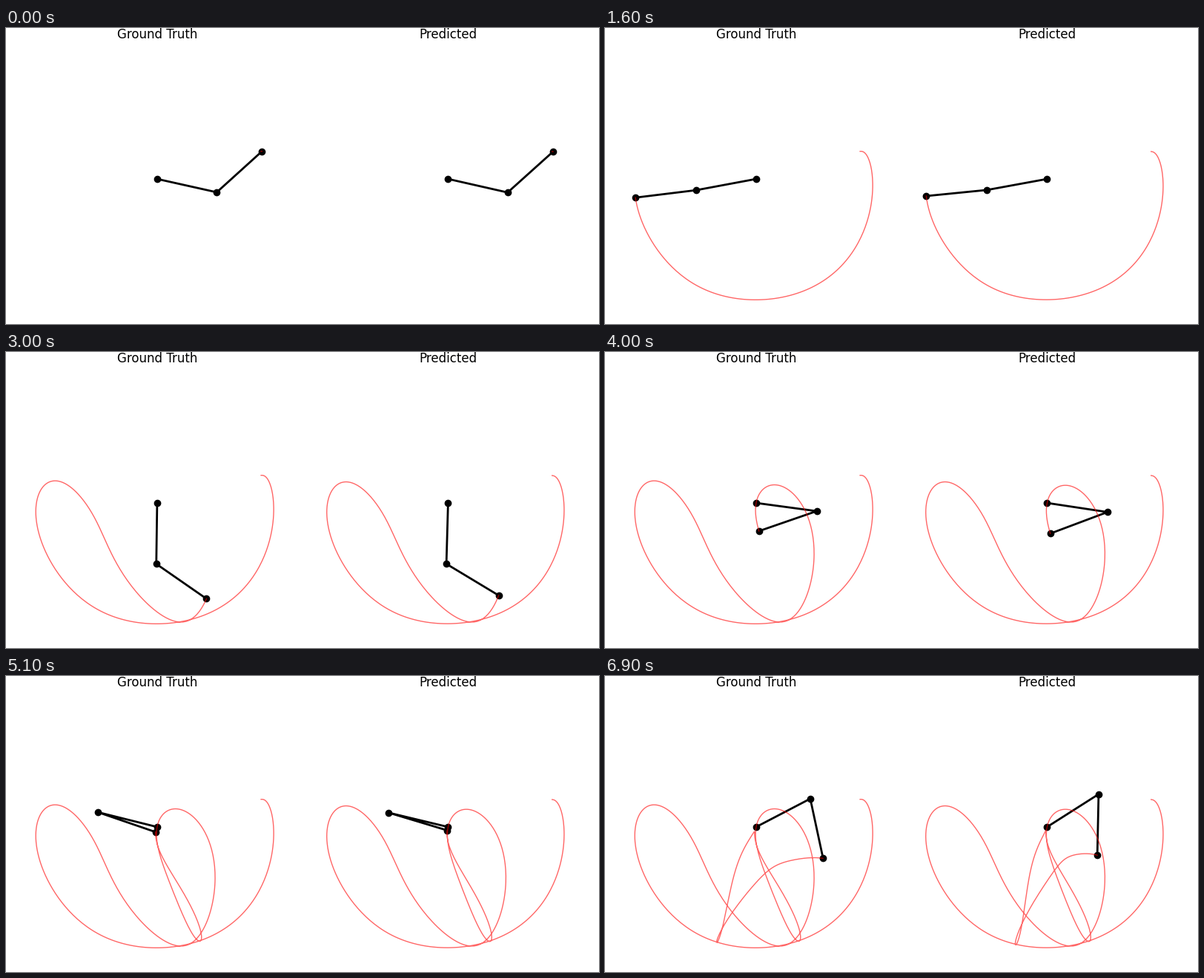
A matplotlib script for the animation above (7000 ms loop, 800 by 400 pixels).

```python
import numpy as np
import matplotlib.pyplot as plt
from matplotlib.animation import FuncAnimation

W, H, DPI = 800, 400, 100
FRAMES, INTERVAL = 70, 100
ARM = 82.4           # length of one rod in pixels
SUB = 10             # path points per frame
GRAVITY = 6.44       # gravity over rod length, per second squared

# Known poses: frame numbers, and both rod angles from straight down in degrees
KEYS = [0, 16, 30, 40, 51, 62, 69]
TRUTH = [(77.4, 132.2), (-79.4, -83.0), (-0.8, 55.2), (82.3, 289.1),
         (-104.0, 431.0), (36.0, 297.7), (117.6, 372.1)]
PREDICTED = [(77.2, 132.0), (-79.6, -84.3), (-1.6, 58.9), (81.4, 290.6),
             (-103.5, 433.2), (41.4, 298.5), (122.5, 358.8)]
# Rough angular speeds when leaving each pose, refined by fit()
SPEEDS = [0.6, -0.8, -0.3, -2.8, -1.0, 6.5, -0.5, 2.8, -1.2, -0.9, 3.6, -1.45]


def slope(s, g):
    """Equations of motion of a double pendulum with equal rods and masses."""
    a, b, va, vb = s
    c, k = np.cos(a - b), np.sin(a - b)
    r1 = -k * vb * vb - 2 * g * np.sin(a)
    r2 = k * va * va - g * np.sin(b)
    acc = (r1 - c * r2) / (2 - c * c)
    return np.array([va, vb, acc, r2 - c * acc])


def shoot(s, g, steps, dt):
    """Runge-Kutta path from state s, one column per variant."""
    path = [s]
    for _ in range(steps):
        k1 = slope(s, g)
        k2 = slope(s + dt / 2 * k1, g)
        k3 = slope(s + dt / 2 * k2, g)
        k4 = slope(s + dt * k3, g)
        s = s + dt / 6 * (k1 + 2 * k2 + 2 * k3 + k4)
        path.append(s)
    return np.array(path)


def start_state(pose, speeds):
    return np.vstack([np.repeat(pose[:, None], speeds.shape[1], axis=1), speeds])


def mismatch(poses, p, per_frame=2, eps=1e-6):
    """Residuals of the joined path and their Jacobian."""
    cols = np.hstack([p[:, None], p[:, None] + eps * np.eye(len(p))])
    g = cols[-1]
    rows = [0.1 * (g - GRAVITY)]
    last = len(KEYS) - 2
    for k in range(last + 1):
        s = start_state(poses[k], cols[2 * k:2 * k + 2])
        steps = (KEYS[k + 1] - KEYS[k]) * per_frame
        end = shoot(s, g, steps, INTERVAL / 1000 / per_frame)[-1]
        rows.extend(end[:2] - poses[k + 1][:, None])
        if k < last:
            rows.extend(0.04 * (end[2:] - cols[2 * k + 2:2 * k + 4]))
    rows = np.array(rows)
    return rows[:, 0], (rows[:, 1:] - rows[:, :1]) / eps


def fit(poses):
    """Levenberg-Marquardt search for the speeds and the gravity."""
    p = np.array(SPEEDS + [GRAVITY])
    r, jac = mismatch(poses, p)
    damp = 0.01
    for _ in range(36):
        normal = jac.T @ jac
        step = np.linalg.solve(normal + damp * np.diag(np.diag(normal) + 1e-9),
                               -jac.T @ r)
        r_new, jac_new = mismatch(poses, p + step)
        if r_new @ r_new < r @ r:
            p, r, jac = p + step, r_new, jac_new
            damp = max(damp / 5, 1e-9)
        else:
            damp *= 4
        if np.abs(step).max() < 1e-7:
            break
    return p


def swing(degrees):
    """Rod angles over the whole loop, SUB points per frame."""
    poses = np.radians(degrees)
    p = fit(poses)
    parts = []
    for k in range(len(KEYS) - 1):
        steps = (KEYS[k + 1] - KEYS[k]) * SUB
        s = start_state(poses[k], p[2 * k:2 * k + 2, None])
        path = shoot(s, p[-1:], steps, INTERVAL / 1000 / SUB)[:, :2, 0]
        path += np.linspace(0, 1, steps + 1)[:, None] * (poses[k + 1] - path[-1])
        parts.append(path[:-1])
    lead_in = poses[0] - 0.02 * p[:2]
    return np.vstack([lead_in, *parts, poses[-1]])


class Pendulum:
    def __init__(self, ax, title, center, degrees):
        angles = swing(degrees)
        rods = ARM * np.stack([np.sin(angles), np.cos(angles)], axis=-1)
        self.pivot = np.array(center)
        self.elbow = self.pivot + rods[:, 0]
        self.tip = self.elbow + rods[:, 1]
        self.arm, = ax.plot([], [], "o-", color="black", lw=2, markersize=6)
        self.trail, = ax.plot([], [], color="red", lw=1, alpha=0.6)
        ax.text(center[0], 14, title, fontsize=12, ha="center", va="baseline")

    def show(self, frame):
        i = 1 + frame * SUB
        self.arm.set_data(*np.array([self.pivot, self.elbow[i], self.tip[i]]).T)
        self.trail.set_data(*self.tip[:i + 1].T)
        return self.arm, self.trail


plt.rcParams["font.family"] = "DejaVu Sans"
fig = plt.figure(figsize=(W / DPI, H / DPI), dpi=DPI, facecolor="white")
ax = fig.add_axes([0, 0, 1, 1])
ax.set_xlim(0, W)
ax.set_ylim(H, 0)
ax.axis("off")

pendulums = [
    Pendulum(ax, "Ground Truth", (203.9, 204.0), TRUTH),
    Pendulum(ax, "Predicted", (596.4, 204.0), PREDICTED),
]


def draw(frame):
    return [line for pendulum in pendulums for line in pendulum.show(frame)]


anim = FuncAnimation(fig, draw, frames=FRAMES, interval=INTERVAL,
                     init_func=lambda: draw(0), repeat=True)
plt.show()
```
